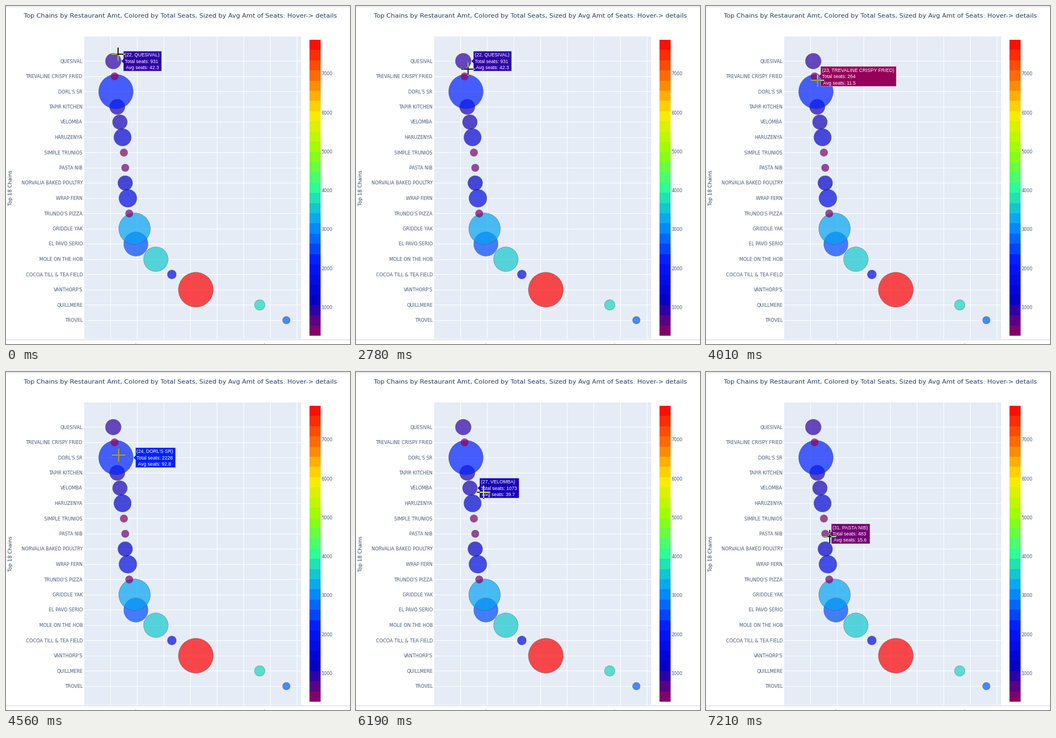
A matplotlib script that plays this animation: 620x610 px, repeating every 8000 ms.

```python
import numpy as np
import matplotlib.pyplot as plt
from matplotlib.animation import FuncAnimation
from matplotlib.colors import LinearSegmentedColormap, to_rgb
from matplotlib.patches import Circle, Polygon, Rectangle
from matplotlib.transforms import Bbox, TransformedBbox

W, H, DPI = 620, 610, 100
LOOP, STEP = 8000, 40
PX = 72 / DPI
INK, TICK_INK, PANEL = "#2a3f5f", "#485a76", "#e5ecf6"

# name, restaurants, total seats
CHAINS = [
    ("QUESIVAL", 22, 931), ("TREVALINE CRISPY FRIED", 23, 264),
    ("DORL'S SR", 24, 2228), ("TAPIR KITCHEN", 25, 1030),
    ("VELOMBA", 27, 1073), ("HARUZENYA", 29, 1354),
    ("SIMPLE TRUNIOS", 30, 385), ("PASTA NIB", 31, 483),
    ("NORVALIA BAKED POULTRY", 31, 1226), ("WRAP FERN", 33, 1590),
    ("TRUNDO'S PIZZA", 34, 421), ("GRIDDLE YAK", 38, 3230),
    ("EL PAVO SERIO", 39, 2546), ("MOLE ON THE HOB", 54, 3564),
    ("COCOA TILL & TEA FIELD", 66, 1591), ("VANTHORP'S", 84, 7870),
    ("QUILLMERE", 132, 3709), ("TROVEL", 152, 2700),
]
LOW, HIGH = 264, 7870

# crosshair: time in ms, left, top; it moves evenly from one to the next
KEYS = np.array([
    (0, 190, 75), (1830, 191, 78), (2640, 191, 100), (3330, 187, 112),
    (3740, 187, 112), (4280, 191, 131), (4560, 191, 138), (5210, 191, 138),
    (5880, 209, 167), (6190, 218, 205), (6470, 218, 246), (6630, 214, 262),
    (6900, 213, 263), (7070, 212, 284), (7210, 211, 285),
])
MOVE_STEP = 137  # the pointer is redrawn about this often
# time in ms at which each chain in turn gets the tooltip
HOVERS = [0, 3180, 4150, 6030, 6190, 6330, 6630, 7070]

cmap = LinearSegmentedColormap.from_list(
    "seats", "#96005a #0000c8 #0019ff #0098ff #2cff96 "
    "#97ff00 #ffea00 #ff6f00 #ff0000".split(), 1024)


def seat_color(total):
    return cmap((total - LOW) / (HIGH - LOW))[:3]


def invert(color):
    return tuple(1 - v for v in to_rgb(color))


def x_of(count):
    return 188.5 + 2.4 * (count - 20)


def y_of(row):
    return 99.5 + 27.5 * row


def radius(count, total):
    return max(6.8, total / count / 2.985)


fig = plt.figure(figsize=(W / DPI, H / DPI), dpi=DPI, facecolor="white")
ax = fig.add_axes([0, 0, 1, 1])
ax.set_xlim(0, W)
ax.set_ylim(H, 0)
ax.axis("off")


def rect(x0, y0, x1, y1, color, z=0):
    ax.add_patch(Rectangle((x0, y0), x1 - x0, y1 - y0, fc=color, lw=0, zorder=z))


def label(x, y, s, size, color=INK, font="DejaVu Sans", **kw):
    return ax.text(x, y, s, fontsize=size * PX, color=color, family=font, **kw)


# page and plot area
rect(0, 1, W, 2, "#d9d9d9")
rect(0, 602, W, 603, "#d4d4d4")
for x in (233, 465):
    rect(x, 609, x + 2, 610, "#b4bac4")
rect(141, 55, 532, 601, PANEL)
for count in range(20, 161, 20):
    x = int(x_of(count))
    rect(x, 55, x + 1, 601, "white", 1)
for row in range(len(CHAINS)):
    y = int(y_of(row))
    rect(141, y, 532, y + 1, "white", 1)

label(32, 21, "Top Chains by Restaurant Amt, Colored by Total Seats, "
      "Sized by Avg Amt of Seats: Hover-> details", 11.5)
label(9, 327.5, "Top 18 Chains", 9.2, rotation=90, ha="center", va="center")

# color bar
BANDS = 29
edges = np.linspace(595, 61, BANDS + 1).round()
for i in range(BANDS):
    rect(546.5, edges[i + 1], 567, edges[i], cmap((i + 0.5) / BANDS))
for seats in range(1000, 8000, 1000):
    label(568.5, 598.5 - (seats - LOW) * 0.07025, seats, 8, TICK_INK)

# bubbles, lowest row first so that upper rows lie on top
bubbles = []
for row, (name, count, total) in reversed(list(enumerate(CHAINS))):
    label(138, y_of(row) + 3, name, 8.25, TICK_INK, ha="right")
    color = seat_color(total)
    dot = Circle((x_of(count), y_of(row)), radius(count, total), fc=color,
                 ec="#444444", lw=0.5 * PX, alpha=0.7, zorder=3)
    ax.add_patch(dot)
    bubbles.append((dot, color))


def shape(color, z, **kw):
    part = Polygon([(0, 0), (1, 0), (1, 1)], fc=color, zorder=z, **kw)
    ax.add_patch(part)
    return part


def tip_labels(color, z):
    return [label(0, 0, "", 8.65, color, "Liberation Sans", zorder=z)
            for _ in range(3)]


# tooltip
box = shape("black", 5, ec=(1, 1, 1, 0.6), lw=0.7 * PX)
tip_text = tip_labels("white", 6)

# The crosshair shows the inverse of whatever lies below it.
cross = shape(invert(PANEL), 7, lw=0)
over_dots = []
for dot, color in bubbles:
    part = shape(invert(color), 7.5, lw=0, alpha=0.7)
    part.set_clip_path(dot)
    over_dots.append(part)
over_box = shape("black", 8, lw=0)
upright_text, level_text = tip_labels("black", 9), tip_labels("black", 9)

quarter = np.array([-1 - 12j, 1 - 12j, 1 - 1j])
CROSS = np.concatenate([quarter * 1j ** k for k in range(4)])


def tip_lines(name, count, total):
    return (f"({count}, {name})", f"Total seats: {total}",
            f"Avg seats: {total / count:.1f}")


def tip_width(chain):
    widths = []
    for text, s in zip(tip_text, tip_lines(*chain)):
        text.set_text(s)
        widths.append(text.get_window_extent().width)
    return max(widths) + 6


tip_widths = [tip_width(c) for c in CHAINS[:len(HOVERS)]]


def show_tip(i):
    _, count, total = CHAINS[i]
    y = y_of(i)
    tip = x_of(count) + radius(count, total) + 0.2
    x0, x1 = tip + 4, tip + 4 + tip_widths[i]
    box.set_xy([(tip, y), (x0, y - 4), (x0, y - 18), (x1, y - 18),
                (x1, y + 18), (x0, y + 18), (x0, y + 4)])
    color = seat_color(total)
    box.set_facecolor(color)
    over_box.set_facecolor(invert(color))
    over_box.set_clip_path(box)
    for texts in (tip_text, upright_text, level_text):
        for k, s in enumerate(tip_lines(*CHAINS[i])):
            texts[k].set_text(s)
            texts[k].set_position((x0 + (4.3 if k == 2 else 2), y - 8.3 + 11.4 * k))


def clip_texts(texts, cx, cy, dx, dy):
    area = Bbox.from_extents(cx - dx, cy + dy, cx + dx, cy - dy)
    for text in texts:
        text.set_clip_on(True)
        text.set_clip_box(TransformedBbox(area, ax.transData))


def pointer_at(now):
    i = np.searchsorted(KEYS[:, 0], now, side="right") - 1
    if i == len(KEYS) - 1:
        return KEYS[-1, 1:]
    (t0, *a), (t1, *b) = KEYS[i], KEYS[i + 1]
    steps = max(1, round((t1 - t0) / MOVE_STEP))
    part = int((now - t0) / (t1 - t0) * steps) / steps
    return np.round(np.array(a) + part * (np.array(b) - a))


def update(frame):
    now = frame * STEP + STEP - 10
    cx, cy = pointer_at(now) + 12
    show_tip(sum(t <= now for t in HOVERS) - 1)
    points = np.column_stack([cx + CROSS.real, cy + CROSS.imag])
    for part in (cross, over_box, *over_dots):
        part.set_xy(points)
    clip_texts(upright_text, cx, cy, 1, 12)
    clip_texts(level_text, cx, cy, 12, 1)
    return []


anim = FuncAnimation(fig, update, frames=LOOP // STEP, interval=STEP,
                     repeat=True, repeat_delay=0, blit=False)
plt.show()
```
